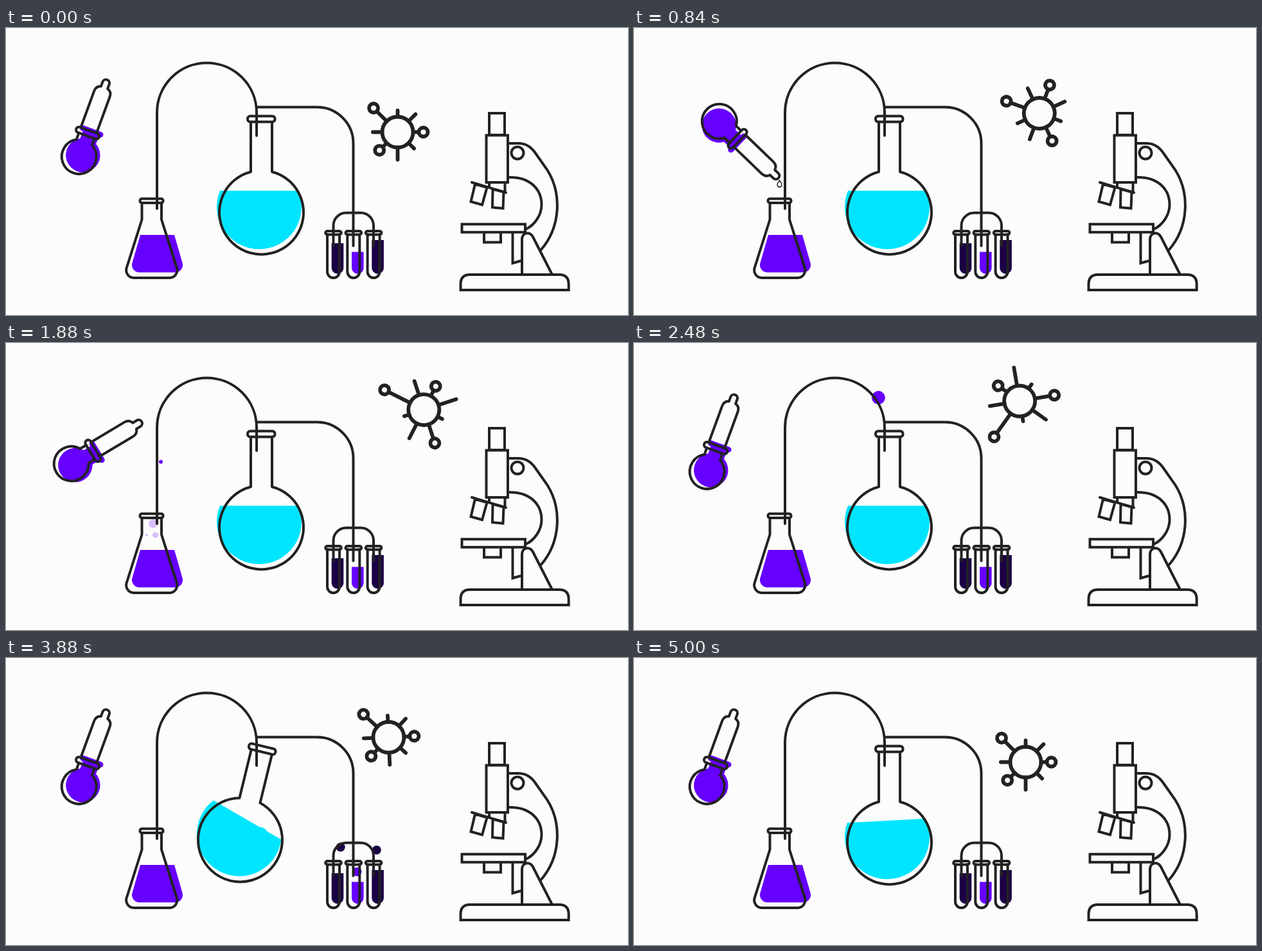
An HTML page that plays this animation: 968x448 px, repeating every 5.04 s.

```html
<!DOCTYPE html>
<html lang="en">
<head>
<meta charset="utf-8">
<title>Laboratory</title>
<style>
  html, body { margin: 0; width: 100%; height: 100%; overflow: hidden; background: #fcfcfc; }
  svg { display: block; width: 100vw; height: 100vh; }
  .ink { fill: none; stroke: #222; stroke-width: 4; stroke-linejoin: round; stroke-linecap: round; }
  .sharp { stroke-linejoin: miter; }
  .violet { fill: #60f; }
  .cyan { fill: #00e5ff; }
  .route { fill: none; stroke: none; }
</style>
</head>
<body>
<svg viewBox="0 0 968 448">
  <path id="mainRoute" class="route" d="M241 282V132a77.5 77.5 0 0 1 155 0V400"/>

  <g id="dropper">
    <g class="violet" transform="translate(5 -4.5)">
      <circle r="26.7"/>
      <path d="M-13-36H13V-20H-13Z"/>
      <rect x="-19" y="-44" width="38" height="9" rx="4.5"/>
    </g>
    <g class="ink">
      <path d="M-13-35V-24A27 27 0 1 0 13-24V-35"/>
      <rect x="-19" y="-44" width="38" height="9" rx="4.5"/>
      <path d="M-13-44V-104Q-13-113-5.5-115V-122.5a5.5 5.5 0 0 1 11 0V-115Q13-113 13-104V-44"/>
    </g>
  </g>

  <path id="drop" d="M0-5Q4 0 3.4 2A3.4 3.4 0 1 1-3.4 2Q-4 0 0-5Z" fill="#fcfcfc" stroke="#222" stroke-width="1.5"/>
  <g id="bubbles" class="violet"></g>
  <path class="violet" d="M209 323H262L274.5 366.5A11.5 11.5 0 0 1 263.500 381.500H207.500A11.500 11.500 0 0 1 196.500 366.500Z"/>
  <g class="ink">
    <rect x="208.500" y="266.500" width="36" height="6.500" rx="3"/>
    <path d="M211.500 273V299L187.500 375A12 12 0 0 0 198 390H255.500A12 12 0 0 0 266 375L242 299V273"/>
  </g>

  <circle id="mainDot"/>
  <g id="flask">
    <path id="liquid" class="cyan" d="M333 254A66 66 0 1 0 455 254Z"/>
    <g class="ink">
      <rect x="376" y="137.500" width="42.500" height="9" rx="4"/>
      <path d="M381 147V224.500A65.500 65.500 0 1 0 414 224.500V147"/>
    </g>
  </g>

  <g id="rack"></g>
  <path class="ink" d="M235 282V132a77.500 77.500 0 0 1 155 0V168M390 123.500H484A56.500 56.500 0 0 1 540.500 180V340M509.500 340V308.500a20 20 0 0 1 20-20H552a20 20 0 0 1 20 20V340"/>

  <g id="virus" class="ink" style="stroke-width:5.800">
    <circle r="24"/>
    <path id="spikes"/>
  </g>

  <g class="ink sharp">
    <path d="M752 133h24v34h-24ZM747.500 167.500H781V241H747.500ZM752 241v8M776.500 241v15M725 241L778 257"/>
    <path d="M730 243.500L748.500 249L741 276L723.500 271ZM757.500 251.500L774.500 256L773.500 281.500L757 280Z"/>
    <path d="M781 180H797Q813 180 823 194L842 221C865.500 258 863.500 311 832 347M781 233C815 232 834 251 833.500 277C833 293 822 308 809 314"/>
    <circle cx="796" cy="195" r="9.500"/>
    <path d="M709.500 306.300H808V318.700H709.500ZM744 319v15.500h26V319M788.500 319v48l14.500-4"/>
    <path d="M803 385V330C803 319 815 317 820 326L850 385M707.500 409v-9q0-15 14.500-15H861q14.700 0 14.700 15v9Z"/>
  </g>
</svg>
<script>
const LOOP = 5040;
const el = id => document.getElementById(id);
const set = (node, attrs) => { for (const k in attrs) node.setAttribute(k, attrs[k]); };
const show = (node, on) => { node.style.display = on ? '' : 'none'; };
const clamp = (v, lo = 0, hi = 1) => Math.min(hi, Math.max(lo, v));

// Smooth step from 0 to 1 between two times
function ease(t, from, to) {
  const u = clamp((t - from) / (to - from));
  return u * u * (3 - 2 * u);
}

function add(parent, tag, attrs) {
  const node = document.createElementNS('http://www.w3.org/2000/svg', tag);
  set(node, attrs);
  return parent.appendChild(node);
}

function makeTube(side, level, color, speed) {
  const rack = el('rack'), x = 540.8 + 31.3 * side, inner = x + 6.5;
  const fork = side ? `V288H${547 + 12 * side}A20 20 0 0 ${side > 0 ? 1 : 0} ${inner} 308` : '';
  const route = add(rack, 'path', {
    class: 'route', d: `M396 123.5H490A56.5 56.5 0 0 1 546.5 180${fork}V365`
  });
  const dot = add(rack, 'circle', { r: 7 });
  add(rack, 'path', { fill: color, d: `M${inner - 9.3} ${level}h18.6V374.5a9.3 9.3 0 0 1 -18.6 0Z` });
  add(rack, 'rect', { class: 'ink', x: x - 12.3, y: 317, width: 24.6, height: 5.5, rx: 2.7 });
  add(rack, 'path', { class: 'ink', d: `M${x - 9.5} 322V380.5a9.5 9.5 0 0 0 19 0V322` });
  return { route, dot, color, speed };
}

const tubes = [
  makeTube(-1, 336, '#1b0045', 0.323),
  makeTube(1, 331, '#1b0045', 0.33),
  makeTube(0, 349.5, '#60f', 0.341)
];

const bubbles = [[229, 7, 1570], [232.5, 4.5, 1730], [219, 2, 1730]].map(([cx, r, start]) =>
  ({ start, node: add(el('bubbles'), 'circle', { cx, r }) }));

function drawDropper(t) {
  const f = ease(t, 40, 770) - ease(t, 1520, 2115);
  set(el('dropper'), {
    transform: `translate(${130.2 + 37.3 * f} ${155.5 + 23.7 * f}) rotate(${20 + 114 * f}) translate(0 48.5)`
  });
}

function drawDrop(t) {
  const y = 243 + 0.00066 * Math.max(0, t - 960) ** 2;
  show(el('drop'), t > 770 && y < 319);
  set(el('drop'), { transform: `translate(226.5 ${y}) scale(${ease(t, 770, 835)})` });
  for (const { start, node } of bubbles) {
    const age = t - start;
    show(node, age > 0 && t < 2290);
    set(node, {
      cy: 317 - 0.113 * age,
      opacity: 0.25 * clamp(age / 120) * clamp((2290 - t) / 250)
    });
  }
}

function drawMainDot(t) {
  const fall = Math.max(0, t - 2793);
  const s = 398 * ease(t, 1451, 2793) + 0.087 * fall + 0.00016 * Math.max(0, fall - 567) ** 2;
  const { x, y } = el('mainRoute').getPointAtLength(s);
  const mix = ease(t, 3500, 3800);
  show(el('mainDot'), t > 1680 && t < 4000);
  set(el('mainDot'), {
    cx: x, cy: y, r: clamp((t - 1680) * 0.015, 0, 10.5),
    fill: `rgb(${102 * (1 - mix)},${229 * mix},255)`
  });
}

function drawTubeDot(t, { route, dot, color, speed }) {
  const s = speed * (t - 2894);
  const { x, y } = route.getPointAtLength(s);
  show(dot, s > 0 && s < route.getTotalLength());
  set(dot, { cx: x, cy: y, fill: s > 288 ? color : '#222' });
}

function drawFlask(t) {
  const tilt = 13.7 * (ease(t, 3380, 3860) - ease(t, 3860, 4590));
  const swing = Math.max(0, t - 3860);
  const slosh = 17.2 * ease(t, 3400, 3860) * Math.exp(-swing / 652) * Math.cos(swing / 760 * 2 * Math.PI);
  set(el('flask'), { transform: `rotate(${tilt} 397.5 148)` });
  set(el('liquid'), { transform: `rotate(${slosh} 394 279)` });
}

function drawVirus(t) {
  const rise = ease(t, 170, 1500), drift = ease(t, 1800, 2830), settle = ease(t, 2980, 4790);
  const x = 609.5 + 42 * rise - 70 * drift + 28 * settle;
  const y = 162.5 - 58 * rise - 19 * drift + 77 * settle;
  const turn = 105 * ease(t, 270, 1252) - 125 * ease(t, 1463, 2700) + 20 * ease(t, 3000, 4130);
  const stretch = rise - ease(t, 2880, 3820);
  let d = '';
  // Every third spike ends in a ring; each kind stretches in its own way
  for (let i = 0; i < 8; i++) {
    const kind = i % 3;
    const rest = [i ? 40 : 53, 33 + 0.8 * i, 37 + 1.2 * i][kind];
    const full = [41 + 4.6 * i, 54 - i, 32][kind];
    const len = rest + (full - rest) * stretch;
    const angle = (i - 3) * Math.PI / 4;
    const at = r => `${r * Math.cos(angle)} ${r * Math.sin(angle)}`;
    d += `M${at(24)}L${at(kind ? len : len - 7)}`;
    if (!kind) d += `A7 7 0 1 1 ${at(len + 7)}A7 7 0 1 1 ${at(len - 7)}`;
  }
  set(el('spikes'), { d });
  set(el('virus'), { transform: `translate(${x} ${y}) rotate(${turn})` });
}

const start = performance.now();
function frame() {
  const t = (performance.now() - start) % LOOP;
  drawDropper(t);
  drawDrop(t);
  drawMainDot(t);
  tubes.forEach(tube => drawTubeDot(t, tube));
  drawFlask(t);
  drawVirus(t);
  requestAnimationFrame(frame);
}
frame();
</script>
</body>
</html>
```
